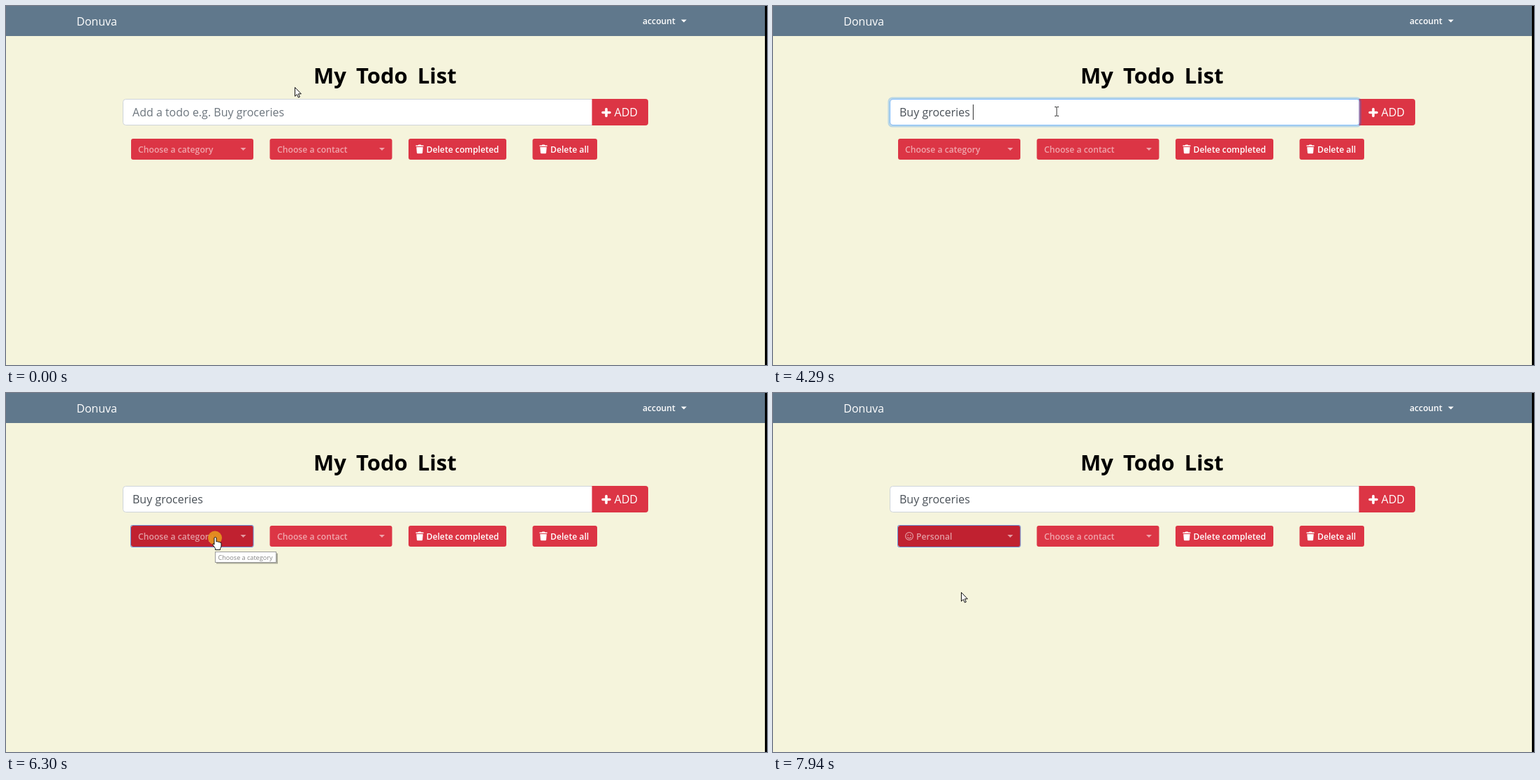
An HTML page that plays this animation: 1089x514 px, repeating every 8000 ms.

```html
<!DOCTYPE html>
<html lang="en">
<head>
<meta charset="utf-8">
<title>Todo list</title>
<style>
  html, body { margin: 0; width: 100%; height: 100%; overflow: hidden; background: #f5f4dc; }
  svg { display: block; font: 16px "Open Sans", sans-serif; }
  text { white-space: pre; }
  .small { font-size: 12.2px; font-weight: 600; fill: #fff; }
  .white { fill: #fff; }
  .red { fill: #dc3545; }
  .dim { opacity: .55; }
  .item { font-size: 12.1px; fill: #212529; }
  .ring { fill: none; stroke: #007bff; stroke-opacity: .25; stroke-width: 2.6; }
  .edge { fill: none; stroke: #80bdff; }
  .caret { stroke: #333; }
  .pointer { fill: #fff; stroke: #111; stroke-linejoin: round; }
</style>
</head>
<body>
<svg width="1089" height="514" viewBox="0 0 1089 514">
  <defs>
    <path id="down" d="M-4-2h8l-4 4z"/>
    <path id="trash" d="M0 1h3l1-1h3l1 1h3v1.6H0zM.8 3.5h9.4l-.6 8.1q-.1 1.2-1.2 1.2H2.6q-1.1 0-1.2-1.2z"/>
    <g id="smile">
      <circle r="5.4" fill="none" stroke="currentColor" stroke-width="1.2"/>
      <path d="M-2.8 1.3Q0 4.6 2.8 1.3" fill="none" stroke="currentColor" stroke-width="1.1"/>
      <circle cx="-1.9" cy="-1.4" r=".9" fill="currentColor"/>
      <circle cx="1.9" cy="-1.4" r=".9" fill="currentColor"/>
    </g>
  </defs>

  <rect width="1089" height="514" fill="#f5f4dc"/>
  <rect width="1086" height="43" fill="#60788c"/>
  <rect x="1086" width="3" height="514"/>
  <text class="white" x="101" y="28" font-weight="500">Donuva</text>
  <text class="small" x="911" y="26">account</text>
  <use href="#down" class="white" x="970" y="21.5"/>
  <text x="440" y="111" font-size="31" font-weight="700" word-spacing="6">My Todo List</text>

  <path d="M839.5 133.5H171.5q-4 0-4 4v29q0 4 4 4H839.5z" fill="#fff" stroke="#ced4da"/>
  <path class="red" d="M838.5 133H915q4 0 4 4v30q0 4-4 4H838.5z"/>
  <path d="M859 147.500v10M854 152.500h10" stroke="#fff" stroke-width="3.600" stroke-linecap="round"/>
  <text class="white" x="870.500" y="158" font-weight="500">ADD</text>
  <g id="focus">
    <rect class="ring" x="165.7" y="131.7" width="675" height="40.6" rx="5"/>
    <rect class="edge" x="167.5" y="133.5" width="671.5" height="37" rx="3.5"/>
  </g>
  <text id="hint" x="181" y="158" fill="#6c757d">Add a todo e.g. Buy groceries</text>
  <text id="entry" x="181" y="158" fill="#495057"></text>
  <path id="caret" class="caret" d="M0 141v22"/>

  <rect id="category" x="179" y="190" width="175" height="30" rx="3"/>
  <rect id="outline" x="178.5" y="189.5" width="175.5" height="31" rx="2" fill="none" stroke="#6a90d8"/>
  <text id="choose" class="small dim" x="189" y="210">Choose a category</text>
  <g id="chosen" class="dim" color="#fff">
    <use href="#smile" x="195" y="205"/>
    <text class="small" x="205" y="210">Personal</text>
  </g>
  <use href="#down" class="white dim" x="339.5" y="205"/>
  <g class="red">
    <rect x="377.5" y="190" width="175" height="30" rx="3"/>
    <rect x="576" y="190" width="140" height="30" rx="3"/>
    <rect x="753.5" y="190" width="92.5" height="30" rx="3"/>
  </g>
  <text class="small dim" x="388" y="210">Choose a contact</text>
  <use href="#down" class="white dim" x="538" y="205"/>
  <use href="#trash" class="white" x="586.5" y="198.5"/>
  <text class="small" x="601.5" y="210">Delete completed</text>
  <use href="#trash" class="white" x="763.5" y="198.5"/>
  <text class="small" x="779" y="210">Delete all</text>

  <g id="menu" color="#212529">
    <rect x="179.5" y="222.5" width="174" height="177" rx="3" fill="#fff" stroke="#ccc"/>
    <rect class="ring" x="185.2" y="230.7" width="163" height="32.6" rx="4"/>
    <rect class="edge" x="186.5" y="232.5" width="160.5" height="29.5" rx="3"/>
    <path id="searchCaret" class="caret" d="M196.5 238v19"/>
    <use href="#smile" x="205" y="278.5"/>
    <g fill="#212529">
      <path d="M198.5 304l7.5-6.5 2.5 2.2v-1.7h2v3.4l3 2.6-1 1-6.5-5.600-6.500 5.600zM201 304.500l5-4.200 5 4.200v4.500h-3.500v-3.500h-3v3.500H201z"/>
      <path d="M199 329.500v-2.500l2-2h1.500v-2h5v2h1.500l2 2v2.500h-3v-1h-1v1h-4v-1h-1v1zM199 330.500h3v1h1v-1h4v1h1v-1h3v3.500h-12zM203.700 325h2.600v-1h-2.600z"/>
      <path d="M199 352h2.500v8H199zM211.500 352h2.500v8h-2.500zM202.300 351l4.200-3.200 4.200 3.200v9h-2.500v-3.500h-3.400v3.500h-2.500z"/>
      <path d="M214 374l-5.200 5.500-1.800-1.700zM206.500 378.500l2.200 2.100q-1 5-9.700 5.400l2-2.200-2 .2q2.500-5.200 7.500-5.500z"/>
    </g>
    <text class="item" x="214.5" y="283">Personal</text>
    <text class="item" x="216.5" y="308.5">Home</text>
    <text class="item" x="216" y="334">Work</text>
    <text class="item" x="218.5" y="359">School</text>
    <text class="item" x="218.5" y="385">Cleaning</text>
  </g>

  <g id="tip">
    <rect x="301" y="229.5" width="88" height="15" fill="#000" opacity=".3"/>
    <rect x="299.5" y="227.5" width="87" height="15" fill="#fff" stroke="#9a9a9a"/>
    <text x="303.5" y="238.5" font-size="9.1" fill="#858585">Choose a category</text>
  </g>

  <circle id="click" r="10" fill="#e6941f" opacity=".92"/>
  <g id="cursor">
    <path id="arrow" class="pointer" d="M.5.5v12.7l2.9-2.7 2 4.5 2-.9-2-4.3h4z"/>
    <path id="beam" d="M-3-6.5h2.3l.7.7.7-.7H3M-3 6.5h2.3l.7-.7.7.7H3M0-6V6" fill="none" stroke="#333"/>
    <path id="hand" class="pointer" d="M-2 11V2Q-2 .5-.5.5T1 2V7Q2.5 5.8 3.5 7.4 5 6.4 6 8 8 7.2 8 9.5V13Q8 15 6.5 16.5V18.5H-.5V16.5L-4 11.5Q-4.5 9.5-3 9.8z"/>
  </g>
</svg>
<script>
const LOOP = 8000;
const PHRASE = "Buy groceries ";
const KEYS = [1870, 2090, 2240, 2390, 2870, 3020, 3170, 3570, 3750, 3890, 3990, 4090, 4190, 4290];
const BACKSPACE = 4670;
// Bursts of screen updates: first, last, count
const BURSTS = [[770, 1230, 7], [5280, 5600, 5], [5830, 6450, 9], [6680, 7080, 6], [7860, 7940, 2]];
// Pointer hotspot: time, x, y
const PATH = [[700, 413, 116], [1000, 406, 151], [5200, 406, 151], [5600, 300, 206],
              [6450, 300, 206], [6680, 298, 216], [7080, 269, 285]];

const $ = id => document.getElementById(id);
const show = (id, on) => $(id).style.opacity = +on;
const toggle = (id, on) => $(id).style.display = on ? "" : "none";
const within = (t, a, b) => t >= a && t < b;
const ramp = (t, a, b) => Math.min(1, Math.max(0, (t - a) / (b - a)));

function snap(t) {
  let s = 0;
  for (const [a, b, n] of BURSTS) {
    const step = (b - a) / (n - 1);
    if (t >= a) s = a + Math.min(n - 1, Math.floor((t - a) / step + 1e-6)) * step;
  }
  return s;
}

function pointerAt(t) {
  let [, x, y] = PATH[0];
  for (let i = 1; i < PATH.length; i++) {
    const [a, x0, y0] = PATH[i - 1], [b, x1, y1] = PATH[i];
    if (t < a) break;
    const k = ramp(t, a, b), e = k * k * (3 - 2 * k);
    x = x0 + (x1 - x0) * e;
    y = y0 + (y1 - y0) * e;
  }
  return [x, y];
}

function draw(t) {
  const s = snap(t), [x, y] = pointerAt(s);
  const typed = KEYS.filter(k => t >= k).length - (t >= BACKSPACE);
  const picked = s >= 7930;

  $("entry").textContent = PHRASE.slice(0, typed);
  toggle("hint", !typed);
  const end = typed ? Math.round(181 + $("entry").getComputedTextLength()) + .5 : 180.5;
  $("caret").setAttribute("transform", `translate(${end})`);
  toggle("caret", s >= 1140 && t < 5830 && !within(t, 1630, 1870) && !within(t, 4850, 5330));
  show("focus", ramp(s, 1000, 1220) * (1 - ramp(s, 6120, 6270)));

  $("category").setAttribute("fill", s >= 6200 ? "#c02130" : s >= 5510 ? "#c82333" : "#dc3545");
  toggle("outline", within(s, 6200, 6370) || picked);
  toggle("choose", !picked);
  toggle("chosen", picked);
  toggle("menu", s >= 6370 && !picked);
  toggle("searchCaret", !within(t, 6920, 7380));
  show("tip", s < 6370 ? ramp(s, 5760, 5960) : 0);

  toggle("click", within(s, 1000, 1150) || within(s, 6200, 6370) || within(s, 7850, 7930));
  $("click").setAttribute("cx", x - 1);
  $("click").setAttribute("cy", y + 1.5);
  $("cursor").setAttribute("transform", `translate(${Math.round(x)} ${Math.round(y)})`);
  const beam = y > 133 && y < 171, hand = y > 190 && !picked;
  toggle("beam", beam);
  toggle("hand", hand);
  toggle("arrow", !beam && !hand);
}

const start = performance.now();
function tick() {
  draw((performance.now() - start) % LOOP);
  requestAnimationFrame(tick);
}
tick();
</script>
</body>
</html>
```
